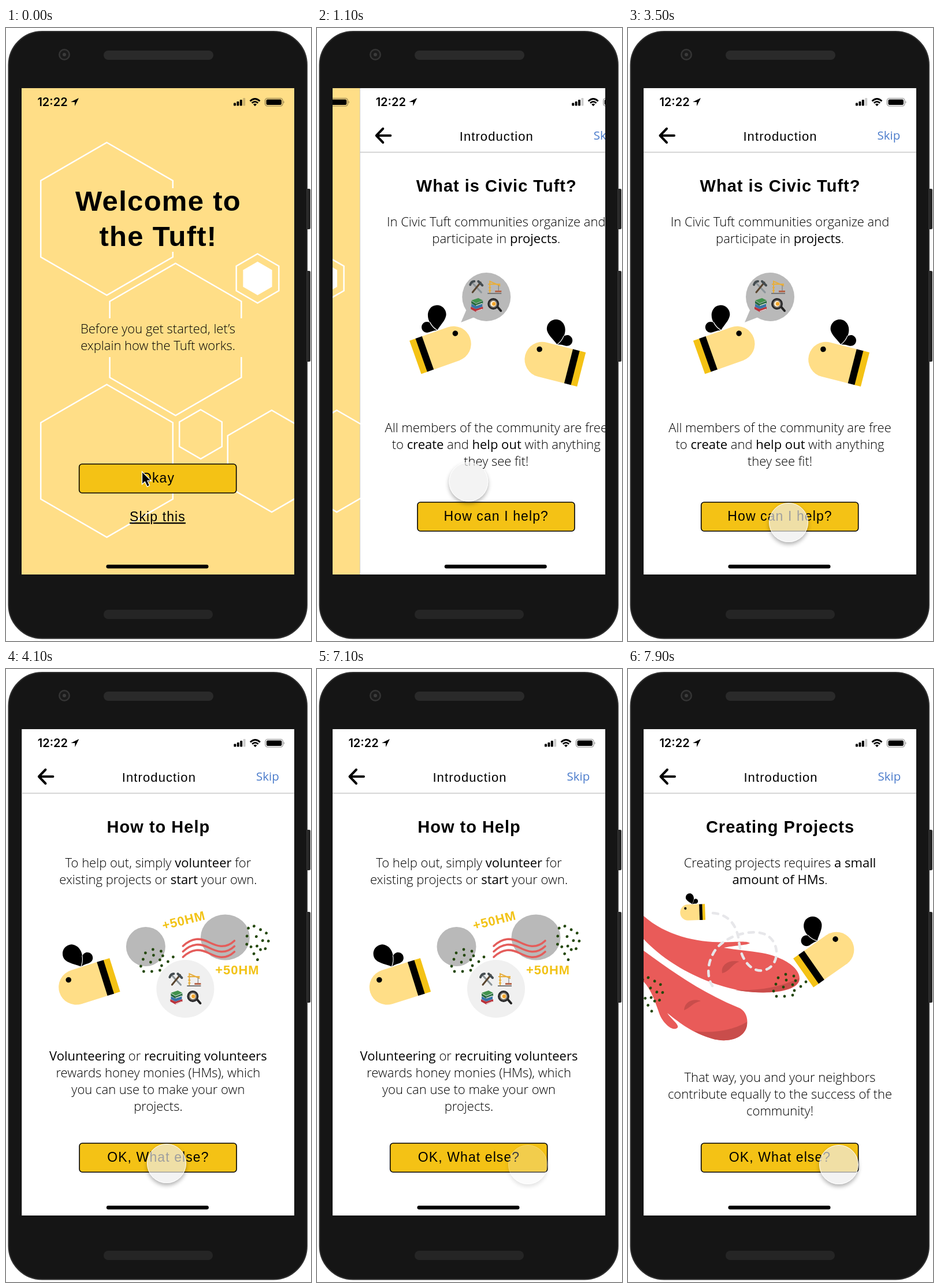
An HTML page that plays this animation: 528 px wide and 1060 px high, repeating every 8 s.

```html
<!DOCTYPE html>
<html lang="en">
<head>
<meta charset="utf-8">
<title>Onboarding</title>
<style>
  html, body { margin: 0; width: 100%; height: 100%; overflow: hidden; background: #fff; }
  svg { position: absolute; left: 0; top: 0; display: block; }
  text { text-anchor: middle; fill: #000; }
  .body { font: 360 22px "Open Sans", "Noto Sans", sans-serif; }
  .body tspan { font-weight: 530; }
  .hero { font: 700 49px "Liberation Sans", Arial, sans-serif; letter-spacing: 1.3px; }
  .title { font: 700 29px "Liberation Sans", Arial, sans-serif; letter-spacing: 1px; }
  .label { font: 400 23px "Liberation Sans", Arial, sans-serif; letter-spacing: 1.1px; }
  .nav { font: 400 22px "Liberation Sans", Arial, sans-serif; letter-spacing: 1.1px; }
  .skip { font: 400 20.5px "Open Sans", "Noto Sans", sans-serif; fill: #4a7bcb; }
  .clock { font: 600 20px Inter, Roboto, sans-serif; }
  .reward { font: 700 22px "Liberation Sans", Arial, sans-serif; letter-spacing: .9px; fill: #f2c318; }
  #touch {
    position: absolute; left: -34px; top: -34px; width: 68px; height: 68px;
    box-sizing: border-box; border-radius: 50%; border: 1.5px solid #fff;
    background: rgba(238, 238, 238, .67); box-shadow: 0 4px 7px rgba(0, 0, 0, .3);
  }
</style>
</head>
<body>
<svg id="stage" width="528" height="1060" viewBox="0 0 528 1060"></svg>
<div id="touch"></div>
<script>
const LOOP = 8000, PAGE_WIDTH = 473, SLIDE = 480, MID = 263;
const YELLOW = '#f4c215', CREAM = '#ffde87', RED = '#e95b59', DARK_RED = '#c94d4b';

const rect = (x, y, w, h, fill, r = 0, extra = '') =>
  `<rect x="${x}" y="${y}" width="${w}" height="${h}" rx="${r}" fill="${fill}" ${extra}/>`;
const circle = (x, y, r, fill = '#000') => `<circle cx="${x}" cy="${y}" r="${r}" fill="${fill}"/>`;
const shape = (d, fill = '#000') => `<path d="${d}" fill="${fill}"/>`;
const line = (d, color, width, extra = '') =>
  `<path d="${d}" fill="none" stroke="${color}" stroke-width="${width}" ${extra}/>`;
const group = (transform, content) => `<g transform="${transform}">${content}</g>`;
const text = (cls, x, y, content, extra = '') =>
  `<text class="${cls}" x="${x}" y="${y}" ${extra}>${content.replace(/\*(.+?)\*/g, '<tspan>$1</tspan>')}</text>`;
const paragraph = (y, ...lines) => lines.map((s, i) => text('body', MID, y + i * 29, s)).join('');

const ROUND = 'stroke-linecap="round" stroke-linejoin="round"';

function hexagon(x, y, r, fill = 'none') {
  const w = r * Math.sqrt(3) / 2, h = r / 2;
  return `<path d="M${x} ${y - r}l${w} ${h}v${r}l${-w} ${h}l${-w} ${-h}v${-r}z"
    fill="${fill}" stroke="#fff" stroke-width="${fill === 'none' ? 2.5 : 0}"/>`;
}

const button = (y, label) =>
  rect(126.7, y, 272, 50, YELLOW, 5, 'stroke="#000" stroke-width="1.6"') + text('label', MID, y + 32, label);

const statusBar = () =>
  text('clock', 80.5, 135, '12:22') +
  shape('M126 121L119 135V128H112Z') +
  [5, 7.5, 10.5, 13.5].map((h, i) =>
    rect(394 + i * 5.4, 134.5 - h, 4, h, i < 3 ? '#000' : '#0003', 1)).join('') +
  line('M422.5 126.5Q431 118.5 439.5 126.5M425.7 129.8Q431 125 436.3 129.8', '#000', 2.8) +
  shape('M428 132Q431 129.5 434 132L431 135.2Z') +
  rect(448.5, 121.5, 30.5, 13.5, 'none', 4, 'stroke="#0007" stroke-width="1.2"') +
  rect(450.5, 123.5, 26.5, 9.5, '#000', 2.2) +
  shape('M480.5 126Q482.8 128.2 480.5 130.5Z', '#0007');

const homeBar = rect(173.5, 928, 177, 6.5, '#000', 3.2);

const introPage = (shift, heading, art, label) =>
  rect(27, 104, PAGE_WIDTH, 841, '#fff') + statusBar() +
  group(`translate(${shift})`,
    line('M80 186H56M67 174L55.5 186L67 198', '#000', 4, ROUND) +
    text('nav', 263.5, 195, 'Introduction') + text('skip', 451.5, 193, 'Skip')) +
  line('M27 214.8H500', '#c9c9c9', 1.4) +
  text('title', MID + .5, 283, heading) + art + button(820, label) + homeBar;

// Local origin is the middle of the tail; the bee faces right.
const beeBody =
  shape('M22 -30.5H70A30.5 30.5 0 0 1 70 30.5H22Z', CREAM) +
  rect(0, -30.5, 11.5, 61, YELLOW) + rect(11, -30.5, 12, 61, '#000') + circle(79, -16, 4.8) +
  shape('M51 -31.5C49 -41 45 -52 36 -52C23 -50 25 -33 37 -33C43 -33 46 -33 51 -31.5Z') +
  shape('M51.5 -31.5C40 -45 40 -67 56 -73C72 -76 80 -60 74 -50C69 -42 59 -38 51.5 -31.5Z') +
  line('M51.5 -31.5Q45 -39 44 -49', '#fff', 1.2);

const bee = (x, y, angle, sx, sy = 1) => group(`translate(${x} ${y}) rotate(${angle}) scale(${sx} ${sy})`, beeBody);

const tools =
  line('M-24 -24L-8 -7', '#8b9499', 3.2, ROUND) + line('M-9 -24L-23 -7', '#59452f', 3, ROUND) +
  line('M-27 -20Q-25 -26 -20 -26M-13 -26L-6 -19', '#444c50', 4, ROUND);
const crane =
  line('M7 -5V-26L25 -18M4 -21H25M5 -15H9M5 -10H9', '#e7ae3d', 2) +
  line('M22 -19V-10', '#777', 1) + rect(16, -10, 11, 3, '#b5654a') + rect(3, -6, 24, 2, '#777');
const books =
  shape('M-25 7L-13 3L-5 7L-17 12Z', '#42924d') + shape('M-25 8L-17 13L-5 8V12L-17 17L-25 12Z', '#246b3c') +
  shape('M-25 13L-17 17L-6 13V18L-17 22L-25 18Z', '#3873a8') +
  shape('M-26 18L-17 22L-5 18V22L-17 27L-26 22Z', '#b9323b') + line('M-17 16L-6 12M-17 26L-6 22', '#eee', 1.3);
const pan =
  line('M20 18L26 25', '#222', 4, ROUND) + circle(13, 13, 10, '#29292b') +
  circle(13, 13, 7, '#77716a') + circle(13, 13, 5, '#fff0d5') + circle(14, 13, 3.2, '#f3a52c');
const icons = (x, y) => group(`translate(${x} ${y})`, tools + crane + books + pan);

const seeds = [
  [-7, -19], [7, -16], [-20, -13], [-6, -9], [10, -8], [28, -6], [-24, -2], [5, -1],
  [19, 2], [-11, 3], [-28, 10], [8, 9], [-23, 19], [-9, 19], [5, 17]
].map(([x, y]) => circle(x, y, 2.4, '#24480b')).join('');
const pollen = (x, y, angle = 0) => group(`translate(${x} ${y}) rotate(${angle})`, seeds);

const welcome =
  rect(27, 104, PAGE_WIDTH, 841, CREAM) + statusBar() +
  hexagon(174.5, 330, 132) + hexagon(293.5, 538.5, 131.5) + hexagon(174.5, 748.5, 132) +
  hexagon(337, 702.5, 42.5) + hexagon(460, 749, 88) +
  hexagon(435.5, 433, 42.5) + hexagon(435.5, 433, 29, '#fff') +
  rect(105, 277, 316, 110, CREAM) + rect(110, 502, 306, 67, CREAM) +
  text('hero', MID + .5, 316, 'Welcome to') + text('hero', MID + .5, 377, 'the Tuft!') +
  paragraph(528, 'Before you get started, let’s', 'explain how the Tuft works.') +
  button(754, 'Okay') + text('label', 262.5, 853, 'Skip this', 'text-decoration="underline"') + homeBar;

const about = introPage(0, 'What is Civic Tuft?',
  paragraph(343, 'In Civic Tuft communities organize and', 'participate in *projects*.') +
  circle(246, 465, 42, '#b9b9b9') + shape('M211 488L202 509L228 499Z', '#b9b9b9') + icons(245, 464) +
  bee(123, 569.5, -19.5, 1) + bee(410.5, 590.5, 14.3, -1) +
  paragraph(699, 'All members of the community are free',
    'to *create* and *help out* with anything', 'they see fit!'),
  'How can I help?');

const waves = [0, 9.5, 19].map(dy =>
  line(`M306 ${479 + dy}C322 ${464 + dy} 336 ${465 + dy} 350 ${472 + dy}S379 ${485 + dy} 395 ${470 + dy}`,
    '#e45d5b', 3.6, ROUND)).join('');

const helping = introPage(1, 'How to Help',
  paragraph(343, 'To help out, simply *volunteer* for', 'existing projects or *start* your own.') +
  circle(241.5, 480, 34, '#b9b9b9') + '<ellipse cx="379" cy="464" rx="42.5" ry="39.5" fill="#b9b9b9"/>' +
  waves + circle(310, 553, 50, '#f0f0f0') + icons(310, 553) +
  pollen(261, 504) + pollen(434, 474, 100) +
  group('translate(309 442) rotate(-14)', text('reward', 0, 0, '+50HM')) + text('reward', 400, 528, '+50HM') +
  bee(188, 529, -17.5, -1) +
  paragraph(677, '*Volunteering* or *recruiting volunteers*', 'rewards honey monies (HMs), which',
    'you can use to make your own', 'projects.'),
  'OK, What else?');

const gloves =
  shape('M27 427C70 465 130 475 182 472C197 471 208 471 211 474C205 478 183 478 166 482C187 486 210 487 232 491C270 498 297 517 297 535C297 559 240 563 200 557C130 545 65 508 27 467Z', RED) +
  shape('M185 555C230 557 265 549 296 535C296 559 232 564 185 555Z', DARK_RED) +
  shape('M163 526C160 512 174 502 193 506C179 510 177 523 163 526Z', DARK_RED) +
  shape('M27 487C75 522 125 558 190 585C204 590 208 604 206 616C202 640 171 647 145 639C111 629 91 613 68 595C75 606 91 616 85 621C76 627 61 612 55 598C47 574 38 551 27 541Z', RED) +
  shape('M114 626C150 631 186 623 206 610V616C202 640 171 647 145 639Q128 634 114 626Z', DARK_RED) +
  shape('M97 590C98 575 113 569 126 574C112 577 108 586 97 590Z', DARK_RED);
const flight = line(
  'M147 422C172 424 188 440 192 470C195 505 215 525 235 521C262 515 265 475 240 460C215 447 160 462 146 495C136 515 138 535 146 548',
  '#e7e7ea', 4.5, 'stroke-dasharray="9 10" stroke-linecap="round"');

const creating = introPage(1, 'Creating Projects',
  paragraph(343, 'Creating projects requires *a small*', '*amount of HMs*.') +
  gloves + flight + pollen(280, 547) + pollen(40, 563, 100) +
  bee(133.5, 420, -2, -.43, .45) + bee(303.5, 525.5, -35, 1) +
  paragraph(714, 'That way, you and your neighbors', 'contribute equally to the success of the', 'community!'),
  'OK, What else?');

const pages = [welcome, about, helping, creating];
const slideStarts = [802, 3640, 7150];

const phone =
  rect(520, 278, 7, 70, '#252525', 2) + rect(520, 420, 7, 157, '#252525', 2) +
  rect(4.5, 6, 516.5, 1049.5, '#151515', 58, 'stroke="#303030" stroke-width="2"') +
  rect(169, 39, 190, 16, '#2a2a2a', 8) + rect(169, 1006, 189, 16, '#252525', 8) +
  circle(101, 46, 10, '#353535') + circle(101, 46, 7.5, '#1b1b1b') + circle(101, 46, 3, '#3b3b3b');

document.getElementById('stage').innerHTML =
  `<defs><clipPath id="screen">${rect(27, 104, 472, 841, '#000')}</clipPath></defs>` + phone +
  `<g clip-path="url(#screen)">${pages.map(p => `<g class="page">${p}</g>`).join('')}</g>` +
  `<path id="arrow" d="M0 0V22L5 17.5L9 26L13 24L9.5 16H16Z" transform="translate(235.5 767)"
    fill="#000" stroke="#fff" stroke-width="1.3"/>`;

const pageNodes = [...document.querySelectorAll('.page')];
const arrow = document.getElementById('arrow');
const touch = document.getElementById('touch');
const clamp = v => Math.min(1, Math.max(0, v));
const ramp = (t, from, to) => clamp((t - from) / (to - from));
const smooth = p => p * p * (3 - 2 * p);

// CSS "ease" curve, solved by bisection.
function ease(p) {
  const bezier = (s, a, b) => 3 * (1 - s) ** 2 * s * a + 3 * (1 - s) * s * s * b + s ** 3;
  let lo = 0, hi = 1;
  for (let i = 0; i < 20; i++) {
    const mid = (lo + hi) / 2;
    if (bezier(mid, .25, .25) < p) lo = mid; else hi = mid;
  }
  return p <= 0 ? 0 : p >= 1 ? 1 : bezier(lo, .1, 1);
}

// Each stop: time, x, y.
const touchPath = [
  [300, 261, 785], [1000, 261, 785], [1300, 266, 784], [2800, 266, 784], [3300, 278, 855],
  [5400, 278, 855], [5700, 432, 857], [7000, 432, 857], [7001, 365, 857], [LOOP, 365, 857]
];

function touchAt(t) {
  const next = touchPath.findIndex(stop => stop[0] > t);
  if (next < 1) return touchPath[0].slice(1);
  const [t0, x0, y0] = touchPath[next - 1], [t1, x1, y1] = touchPath[next];
  const p = smooth(ramp(t, t0, t1));
  return [x0 + (x1 - x0) * p, y0 + (y1 - y0) * p];
}

function draw(t) {
  const position = slideStarts.reduce((sum, start) => sum + ease(ramp(t, start, start + SLIDE)), 0);
  pageNodes.forEach((node, i) => {
    const offset = i - position;
    node.setAttribute('transform', `translate(${offset * PAGE_WIDTH})`);
    node.style.display = Math.abs(offset) < 1 ? '' : 'none';
  });

  arrow.style.display = t < 300 ? '' : 'none';

  const [x, y] = touchAt(t);
  touch.style.transform = `translate(${x}px, ${y}px)`;
  touch.style.opacity = t < 7000
    ? ramp(t, 300, 450) * (1 - ramp(t, 6850, 7000))
    : ramp(t, 7040, 7200);
}

function tick() {
  draw(performance.now() % LOOP);
  requestAnimationFrame(tick);
}
tick();
</script>
</body>
</html>
```
